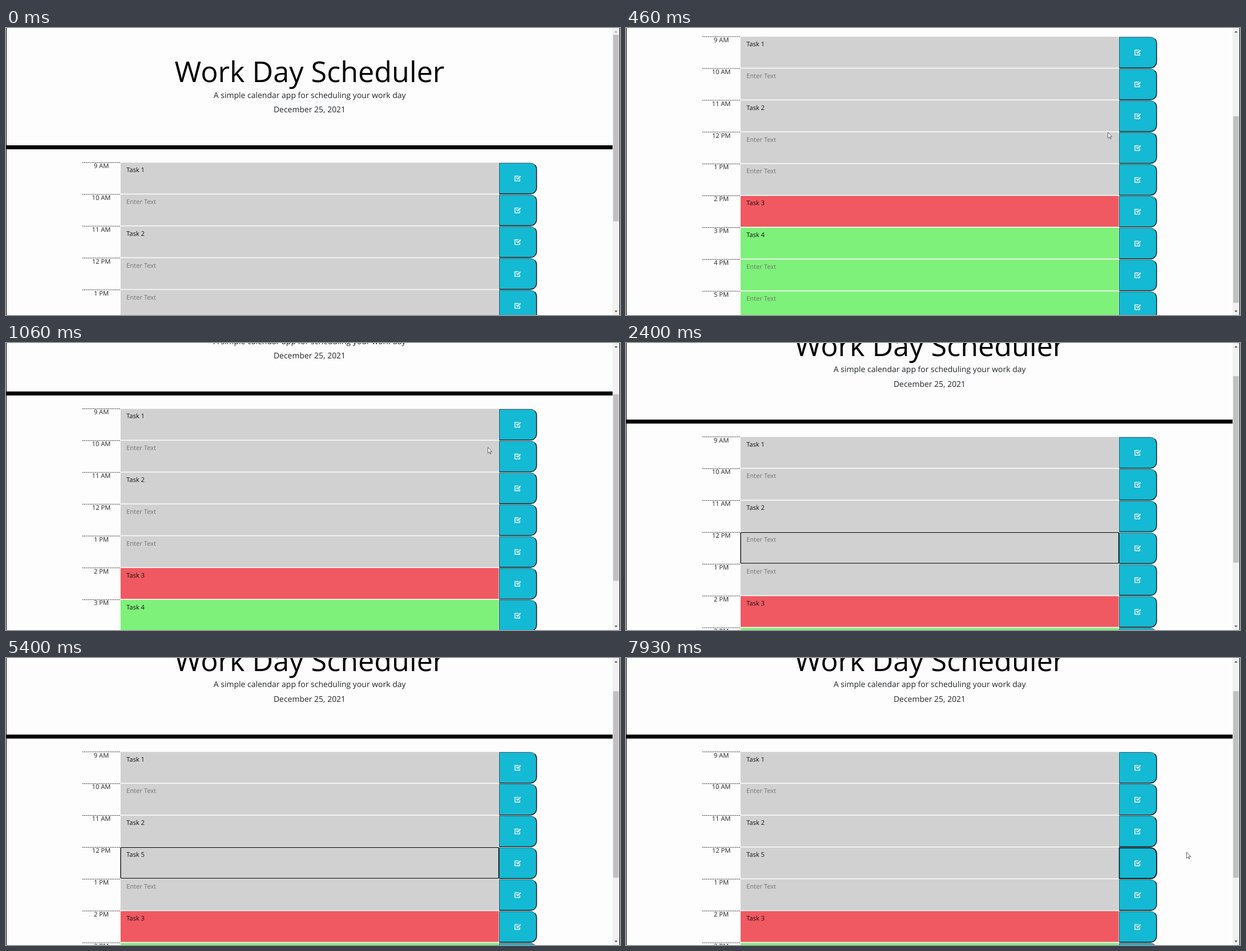
These frames come from a looping animation (1076 by 504 pixels, 8000 ms). An HTML page:

```html
<!DOCTYPE html>
<html lang="en">
<head>
<meta charset="utf-8">
<title>Work Day Scheduler</title>
<style>
html, body { margin: 0; width: 100%; height: 100%; overflow: hidden; background: #fdfdfd; }
svg { display: block; width: 1076px; height: 504px; font-family: "Open Sans", sans-serif; }
text { fill: #212529; font-size: 11.18px; white-space: pre; text-rendering: geometricPrecision; }
.mid { text-anchor: middle; }
.title { font-size: 50.3px; fill: #000; }
.lead { font-size: 13.97px; }
.task { fill: #111; }
.hint { fill: #757575; }
</style>
</head>
<body>
<svg id="stage" viewBox="0 0 1076 504"></svg>
<script>
const LOOP = 8000, TICK = 1000 / 15;
const TOP = 236.3, PITCH = 55.88, MAX = 235, REST = 71.5, EDIT = 3;
const GREY = '#d1d1d1', RED = '#f05961', GREEN = '#7ef17a', TEAL = '#14b9d4';
const HINT = 'Enter Text';
const rows = [
  ['9 AM', 'Task 1', GREY], ['10 AM', '', GREY], ['11 AM', 'Task 2', GREY],
  ['12 PM', '', GREY], ['1 PM', '', GREY], ['2 PM', 'Task 3', RED],
  ['3 PM', 'Task 4', GREEN], ['4 PM', '', GREEN], ['5 PM', '', GREEN]
];
// [ms, value] steps, each holding until the next
const typing = [[0, ''], [3860, 'T'], [4000, 'Ta'], [4200, 'Tas'], [4460, 'Task'], [4660, 'Task '], [4860, 'Task 5']];
const caretOn = [[0, 0], [1860, 1], [2400, 0], [2930, 1], [3460, 0], [3860, 1], [5400, 0], [5930, 1], [6460, 0]];
const focus = [[0, ''], [1860, 'field'], [7260, 'button']];
// [ms, x, y] points of the pointer's path
const path = [[6530, 852, 366], [6800, 912, 357], [6930, 930, 353], [7260, 906, 355], [7400, 906, 355], [7930, 982.5, 341]];

const stage = document.getElementById('stage');

function add(parent, tag, attrs, text) {
  const el = document.createElementNS('http://www.w3.org/2000/svg', tag);
  for (const k in attrs) el.setAttribute(k, attrs[k]);
  if (text !== undefined) el.textContent = text;
  parent.append(el);
  return el;
}
const rect = (parent, x, y, width, height, fill) => add(parent, 'rect', { x, y, width, height, fill });
const show = (el, on) => el.setAttribute('visibility', on ? 'visible' : 'hidden');

rect(stage, 0, 0, 1076, 504, '#fdfdfd');
const page = add(stage, 'g', {});
add(page, 'text', { x: 532, y: 94.6, class: 'mid title' }, 'Work Day Scheduler');
add(page, 'text', { x: 532.2, y: 122.9, class: 'mid lead' }, 'A simple calendar app for scheduling your work day');
add(page, 'text', { x: 532, y: 148, class: 'mid lead' }, 'December 25, 2021');
rect(page, 1, 206, 1062, 7, '#000');

const BUTTON = 'M864.5 .9H919.3A10.5 10.5 0 0 1 929.8 11.4V44.4A10.5 10.5 0 0 1 919.3 54.9H864.5Z';
// checked box on an 8-unit grid
const CHECK = 'M0 0V7H7V3.4L6 4.4V6H1V1H4.6L5.6 0ZM7 0L4 3L3 2L2 3L4 5L8 1Z';
const built = rows.map(([hour, task, fill], i) => {
  const g = add(page, 'g', { transform: `translate(0 ${TOP + i * PITCH})` });
  add(g, 'path', { d: 'M133.7 0H200.5', stroke: '#222', 'stroke-width': .9, 'stroke-dasharray': '2.1 1.1' });
  add(g, 'text', { x: 167, y: 9.7, class: 'mid' }, hour);
  rect(g, 200.5, -.1, 663.4, 54.9, '#eee');
  rect(g, 200.9, .3, 662.4, 54.1, fill);
  const label = add(g, 'text', { x: 211, y: 16.8, class: task ? 'task' : 'hint' }, task || HINT);
  add(g, 'path', { d: BUTTON, fill: TEAL, stroke: '#3a4346', 'stroke-width': .9 });
  add(g, 'path', { d: 'M926.7 3.9A10.5 10.5 0 0 1 929.8 11.4V44.4A10.5 10.5 0 0 1 919.3 54.9H864.5', fill: 'none', stroke: '#10191c', 'stroke-width': 1.2 });
  add(g, 'path', { d: CHECK, fill: '#fff', transform: 'translate(891.2 23.2) scale(1.397)' });
  return { g, label };
});

const edit = built[EDIT];
const ring = add(edit.g, 'rect', { x: 200.9, y: .2, width: 662.6, height: 54.2, rx: 1.5, fill: 'none', stroke: '#111', 'stroke-width': 1.4 });
const caret = rect(edit.g, 0, 5.8, .9, 14.4, '#111');
const pressed = add(edit.g, 'path', { d: BUTTON, fill: 'none', stroke: '#0a0f11', 'stroke-width': 1.6 });

rect(stage, 1063, 0, 12, 504, '#f1f1f1');
const thumb = rect(stage, 1064, 12, 10, 327.5, '#c1c1c1');
const up = add(stage, 'path', { d: 'M1066.3 8L1069 5L1071.7 8Z' });
const down = add(stage, 'path', { d: 'M1066.3 496.3L1069 499.3L1071.7 496.3Z' });
rect(stage, 0, 0, 1, 504, '#000');
rect(stage, 1075, 0, 1, 504, '#000');
const arrow = add(stage, 'path', {
  d: 'M0 0V10.6L2.4 8.4L4 12L5.5 11.3L3.9 7.8H7.2Z',
  fill: '#fff', stroke: '#3c3c50', 'stroke-width': .8, 'stroke-linejoin': 'round'
});

const held = (steps, t) => steps.filter(s => s[0] <= t).pop()[1];
const span = (t, a, b) => Math.min(1, Math.max(0, (t - a) / (b - a)));
const smooth = p => p * p * (3 - 2 * p);
const out = (p, k) => 1 - (1 - p) ** k;

function scrollAt(t) {
  if (t < 800) return MAX * out(span(t, 0, 660), 2.37);
  if (t < 1330) return MAX * (1 - smooth(span(t, 800, 1330)));
  return REST * out(span(t, 1330, 1660), 2);
}

function pointerAt(t) {
  if (t >= 60 && t < 1730) return [844.5, 183];
  if (t < 6600) return null;
  const i = path.findIndex(p => p[0] >= t);
  if (i < 0) return path[path.length - 1].slice(1);
  const a = path[i - 1], b = path[i], p = span(t, a[0], b[0]);
  return [a[1] + (b[1] - a[1]) * p, a[2] + (b[2] - a[2]) * p];
}

function draw(ms) {
  // fifteen pictures a second, on times rounded down to 10 ms
  const t = Math.floor(Math.floor((ms + 8) / TICK) * TICK / 10 + .01) * 10;
  const y = scrollAt(t);
  page.setAttribute('transform', `translate(0 ${-y})`);
  thumb.setAttribute('y', 12 + y * .647);
  up.setAttribute('fill', y < 1 ? '#a3a3a3' : '#505050');
  down.setAttribute('fill', y > MAX - 1 ? '#a3a3a3' : '#505050');

  const typed = held(typing, t), where = held(focus, t);
  edit.label.textContent = typed || HINT;
  edit.label.setAttribute('class', typed ? 'task' : 'hint');
  caret.setAttribute('x', 211 + (typed ? edit.label.getComputedTextLength() : 0));
  show(caret, held(caretOn, t));
  show(ring, where === 'field');
  show(pressed, where === 'button');

  const at = pointerAt(t);
  show(arrow, at);
  if (at) arrow.setAttribute('transform', `translate(${at})`);
}

const start = performance.now();
function tick() {
  draw((performance.now() - start) % LOOP);
  requestAnimationFrame(tick);
}
tick();
</script>
</body>
</html>
```
